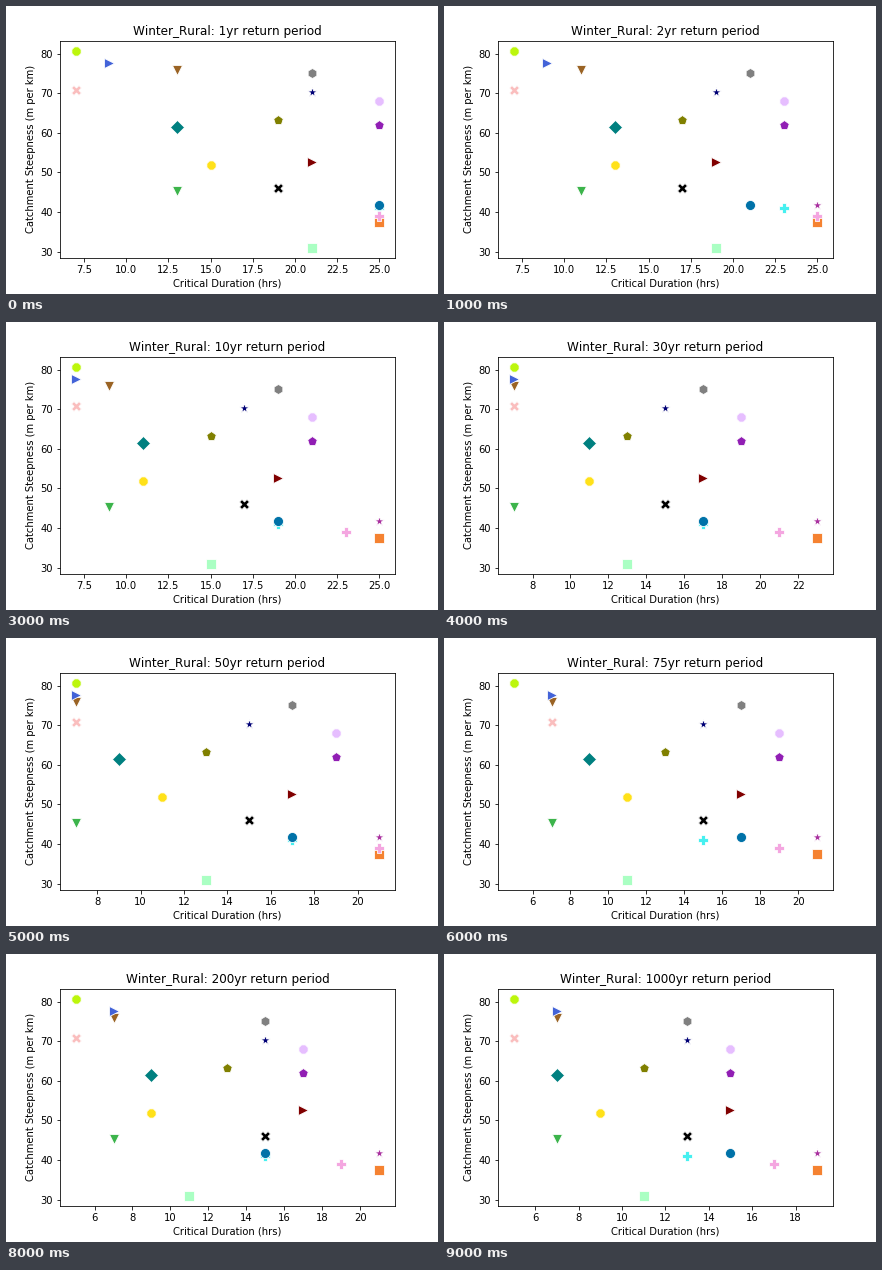
Write a matplotlib script that moves like this. It is 432 by 288 pixels and loops after 10000 ms.

```python
import math

import matplotlib.pyplot as plt
from matplotlib.animation import FuncAnimation
from matplotlib.ticker import MultipleLocator

PERIODS = [1, 2, 5, 10, 30, 50, 75, 100, 200, 1000]
LONGEST = 25

# marker, colour, steepness, duration at 1 yr, duration at 1000 yr, bend
SITES = [
    ("*", "#a9309f", 41.7, 27.0, 18.1, 1),
    ("P", "#46f0f0", 40.9, 24.1, 12.9, 1.4),
    ("s", "#f58231", 37.5, 27.0, 18.1, 1),
    ("P", "#f4a6e0", 39.1, 26.5, 16.0, 1),
    ("o", "#0072a8", 41.8, 24.2, 15.7, 3),
    ("8", "#bcf60c", 80.82, 7.95, 4.55, 1),
    ("v", "#9a6324", 75.9, 12.0, 6.2, 2),
    (">", "#4363d8", 77.8, 8.6, 6.5, 2),
    ("X", "#fabebe", 70.8, 7.4, 5.4, 1),
    ("D", "#008080", 61.6, 13.0, 7.2, 1),
    ("8", "#ffe119", 51.8, 14.1, 8.4, 1.2),
    ("v", "#3cb44b", 45.2, 13.0, 6.2, 2),
    ("p", "#808000", 63.3, 18.1, 11.4, 1.5),
    ("*", "#000075", 70.3, 20.1, 13.4, 1.5),
    ("h", "#808080", 75.1, 21.9, 13.3, 0.9),
    ("8", "#e6beff", 68.1, 24.2, 15.4, 1.2),
    ("p", "#911eb4", 62.0, 24.2, 15.4, 1.2),
    (">", "#800000", 52.6, 20.1, 15.3, 1),
    ("X", "#000000", 46.0, 18.1, 13.3, 1),
    ("s", "#aaffc3", 30.92, 20.2, 10.9, 2.5),
]


def duration(period, first, last, bend):
    """Storm length, falling with the log of the period, in odd hours."""
    left = 1 - math.log10(period) / 3
    hours = last + (first - last) * left ** bend
    return min(LONGEST, 2 * math.floor(hours / 2) + 1)


def padded(values, margin=0.0512):
    lo, hi = min(values), max(values)
    pad = (hi - lo) * margin
    return lo - pad, hi + pad


plt.rcParams["font.family"] = "DejaVu Sans"
plt.rcParams["text.kerning_factor"] = 6
fig = plt.figure(figsize=(6, 4), dpi=72, facecolor="white")
fig.subplots_adjust(left=0.125, right=0.9, bottom=0.125, top=0.88)
ax = fig.add_subplot()
ax.set_xlabel("Critical Duration (hrs)")
ax.set_ylabel("Catchment Steepness (m per km)")
ax.set_ylim(padded([site[2] for site in SITES]))
ax.yaxis.set_major_locator(MultipleLocator(10))
title = ax.set_title("")
points = [
    ax.scatter([0], [y], s=100, marker=marker, color=color,
               edgecolors="white", linewidths=0.8)
    for marker, color, y, *_ in SITES
]


def update(i):
    hours = [duration(PERIODS[i], *site[3:]) for site in SITES]
    for point, x, site in zip(points, hours, SITES):
        point.set_offsets([(x, site[2])])
    ax.set_xlim(padded(hours))
    step = 2.5 if max(hours) == LONGEST else 2
    ax.xaxis.set_major_locator(MultipleLocator(step))
    title.set_text(f"Winter_Rural: {PERIODS[i]}yr return period")
    return points


anim = FuncAnimation(fig, update, frames=len(PERIODS), interval=1000,
                     init_func=lambda: update(0), repeat=True, repeat_delay=0)
plt.show()
```
